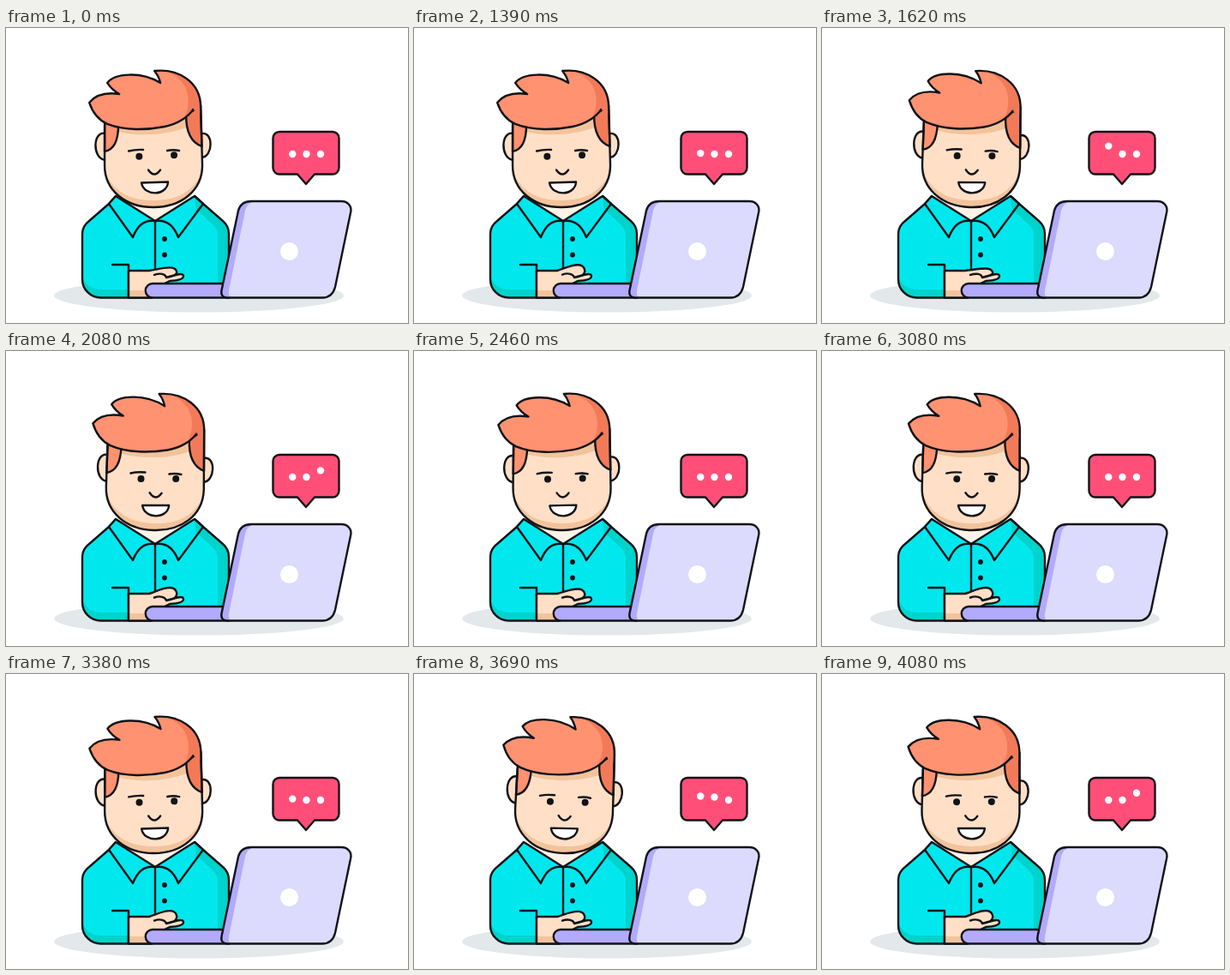
Animation of 469 by 344 pixels, one loop 4150 ms. Source, as an HTML page:

```html
<!DOCTYPE html>
<html lang="en">
<head>
<meta charset="utf-8">
<title>Typing a message</title>
<style>
  html, body { margin: 0; width: 100%; height: 100%; overflow: hidden; background: #fff; }
  svg { display: block; width: 100%; height: 100%; }
  .ink { stroke: #111317; stroke-width: 2.4; stroke-linecap: round; stroke-linejoin: round; }
  .line { fill: none; }
  .skin { fill: #ffdfc6; }
  .skin-shade { fill: #f3c39b; }
  .neck { fill: #fff2e6; }
  .shirt { fill: #00e8ee; }
  .shirt-shade { fill: #00d3cb; }
  .hair { fill: #ff9270; }
  .hair-shade { fill: #f27a58; }
  .lilac { fill: #b2aafb; }
  .dark { fill: #111317; }
</style>
</head>
<body>
<svg viewBox="0 0 469 344">
  <ellipse cx="225" cy="312" rx="169" ry="19.5" fill="#e3e8ea"/>

  <g id="body">
    <path class="shirt" d="M128 196L120 205L97 225Q89 231 89 240V293A21.500 21.500 0 0 0 110.500 314.500H260V240Q260 231 253 225L230 205L220 196Z"/>
    <path class="shirt-shade" d="M219 197L230 205L253 225Q260 231 260 240V298H247V243Q247 234 241 229L224 213Z"/>
    <path class="shirt-shade" d="M89 288V293A21.500 21.500 0 0 0 110.500 314.500H143V305H112Q93 305 89 288Z"/>
    <path class="neck" d="M130 196L174 225L218 196Z"/>
    <path class="ink line" d="M260 270V240Q260 231 253 225L230 205L220 196M128 196L120 205L97 225Q89 231 89 240V293A21.500 21.500 0 0 0 110.500 314.500H170"/>
    <path class="ink shirt" d="M128 196L120 205L148 244C153 231 161 223 174 225Z"/>
    <path class="shirt shirt-shade" d="M220 196L230 205L222 216L211 202Z"/>
    <path class="shirt" d="M220 196L211 202L174 225C188 223 196 231 201 244L222 216Z"/>
    <path class="ink line" d="M220 196L230 205L201 244C196 231 188 223 174 225Z"/>
    <path class="ink line" d="M174 225V281"/>
    <circle class="dark" cx="185" cy="246" r="2.9"/>
    <circle class="dark" cx="185" cy="264.500" r="2.9"/>
  </g>

  <g id="head">
    <path class="ink skin" d="M116 123C101 119 100 153 116 154"/>
    <path class="ink skin" d="M228 123C242 120 242 150 228 151"/>
    <path class="skin" d="M115 95V160C115 190 140 209 172 209C204 209 229 190 229 160L227 90Z"/>
    <path class="skin-shade" d="M115.500 168C119 193 143 209 172 209C203 209 225 193 228.500 168C219 190 201 201 172 201C143 201 125 190 115.500 168Z"/>
    <path class="skin-shade" d="M128 114L131 121C155 127 190 125 212 115L210 100Z"/>
    <path class="ink hair" d="M115 106V144C126 142 131 130 131 113Z"/>
    <path class="ink hair-shade" d="M210 102C210 122 217 134 228.500 138L227 90Z"/>
    <path class="hair" d="M97 87C105 77 118 75 132 77Q123 72 118 64C126 53 157 50 180 64Q178 56 173 50C200 47 227 62 227 92V98L218 95C212 104 200 112 185 115C165 119 138 120 118 112C107 107 101 99 97 87Z"/>
    <path class="hair-shade" d="M190 52C212 61 218 84 208 105Q215 100 218 95L227 100V92C227 68 209 53 190 52Z"/>
    <path class="ink line" d="M218 95C212 104 200 112 185 115C165 119 138 120 118 112C107 107 101 99 97 87C105 77 118 75 132 77Q123 72 118 64C126 53 157 50 180 64Q178 56 173 50C200 47 227 62 227 92L229 160C229 190 204 209 172 209C140 209 115 190 115 160V113"/>
    <path class="ink line" d="M143 143.500Q151 141.500 160 142M188 143Q195 141.500 202 143M166 165.500Q173 175.500 180 165.500"/>
    <circle class="dark" cx="155.300" cy="149.700" r="4"/>
    <circle class="dark" cx="196" cy="148.300" r="4"/>
    <path class="ink" fill="#fff" d="M158 180.500L189 179.500C188 196 161 197 158 180.500Z"/>
  </g>

  <path class="ink line" d="M124 276H143V314"/>
  <path class="skin" d="M143 283H172L190 292V314H143Z"/>
  <path class="skin-shade" d="M144 306H170V313H144Z"/>
  <path id="hand" class="ink skin"/>
  <path id="thumb" class="ink line"/>
  <path class="ink line" d="M143 283V314.500H170"/>

  <path class="ink lilac" d="M260 298H171A8.250 8.250 0 0 0 171 314.500H260Z"/>
  <path fill="#dcdafd" d="M286 202H391C399 202 404 208 402 215.500L384 302C382 310 377 314.500 369 314.500H258Q250 314 251.500 306L271 213Q274 202 286 202Z"/>
  <path class="lilac" d="M290 202H286Q274 202 271 213L251.500 306Q250 314 258 314.500H263Q259 313 260 306L279 213Q281 204 290 202Z"/>
  <path class="ink line" d="M286 202H391C399 202 404 208 402 215.500L384 302C382 310 377 314.500 369 314.500H258Q250 314 251.500 306L271 213Q274 202 286 202Z"/>
  <circle cx="330.500" cy="260.500" r="10.500" fill="#fff"/>

  <path class="ink" fill="#ff4f79" d="M319 121H381A7.500 7.500 0 0 1 388.500 128.500V163A7.500 7.500 0 0 1 381 170.500H360L350 182L340 170.500H319A7.500 7.500 0 0 1 311.500 163V128.500A7.500 7.500 0 0 1 319 121Z"/>
  <g id="dots" fill="#fff">
    <circle cx="334.300" cy="147" r="4.200"/>
    <circle cx="350.500" cy="147" r="4.200"/>
    <circle cx="367" cy="147" r="4.200"/>
  </g>
</svg>
<script>
  const LOOP = 4150, HOLD = 1390, STEPS = 36;
  const STEP = (LOOP - HOLD) / STEPS;
  const byId = id => document.getElementById(id);
  const head = byId('head'), hand = byId('hand'), thumb = byId('thumb');
  const dots = [...byId('dots').children];
  const dotStarts = [-0.6, 2.9, 6.9];

  // Smooth 0 -> 1 -> 0 wave, starting from 0.
  const wave = phase => (1 - Math.cos(2 * Math.PI * phase)) / 2;

  function hop(step, start) {
    const local = ((step - start) % 25.85 + 25.85) % 25.85;
    return local < 6.2 ? 10 * wave(local / 6.2) : 0;
  }

  function drawHand(lift) {
    const top = 281.5 - 5.5 * lift;
    hand.setAttribute('d',
      `M143 283H167C175 ${282.5 - 2 * lift} 183 ${top} 191 ${top}` +
      `C199 ${top} 202 ${287 - 3 * lift} 196 288.5` +
      'C202 286.5 207 286 207 289.5C207 293.5 199 294.5 191 295L185 298');
    thumb.setAttribute('d',
      `M173 ${288 - lift / 2}C180 ${286 - lift} 186 ${286 + lift} 187 291Q191 290 196 288.5`);
  }

  function draw(time) {
    // The picture advances in discrete steps after the opening pause.
    const t = time % LOOP;
    const step = t < HOLD ? -1 : Math.floor((t - HOLD) / STEP + 0.05);

    head.setAttribute('transform', `rotate(${3.8 * wave((step + 0.5) / 12.8)} 174 212)`);
    drawHand(1 - wave((step - 0.25) / 4.33));
    dots.forEach((dot, i) => dot.setAttribute('cy', 147 - hop(step, dotStarts[i])));
  }

  const start = performance.now();
  function tick() {
    draw(performance.now() - start);
    requestAnimationFrame(tick);
  }
  tick();
</script>
</body>
</html>
```
